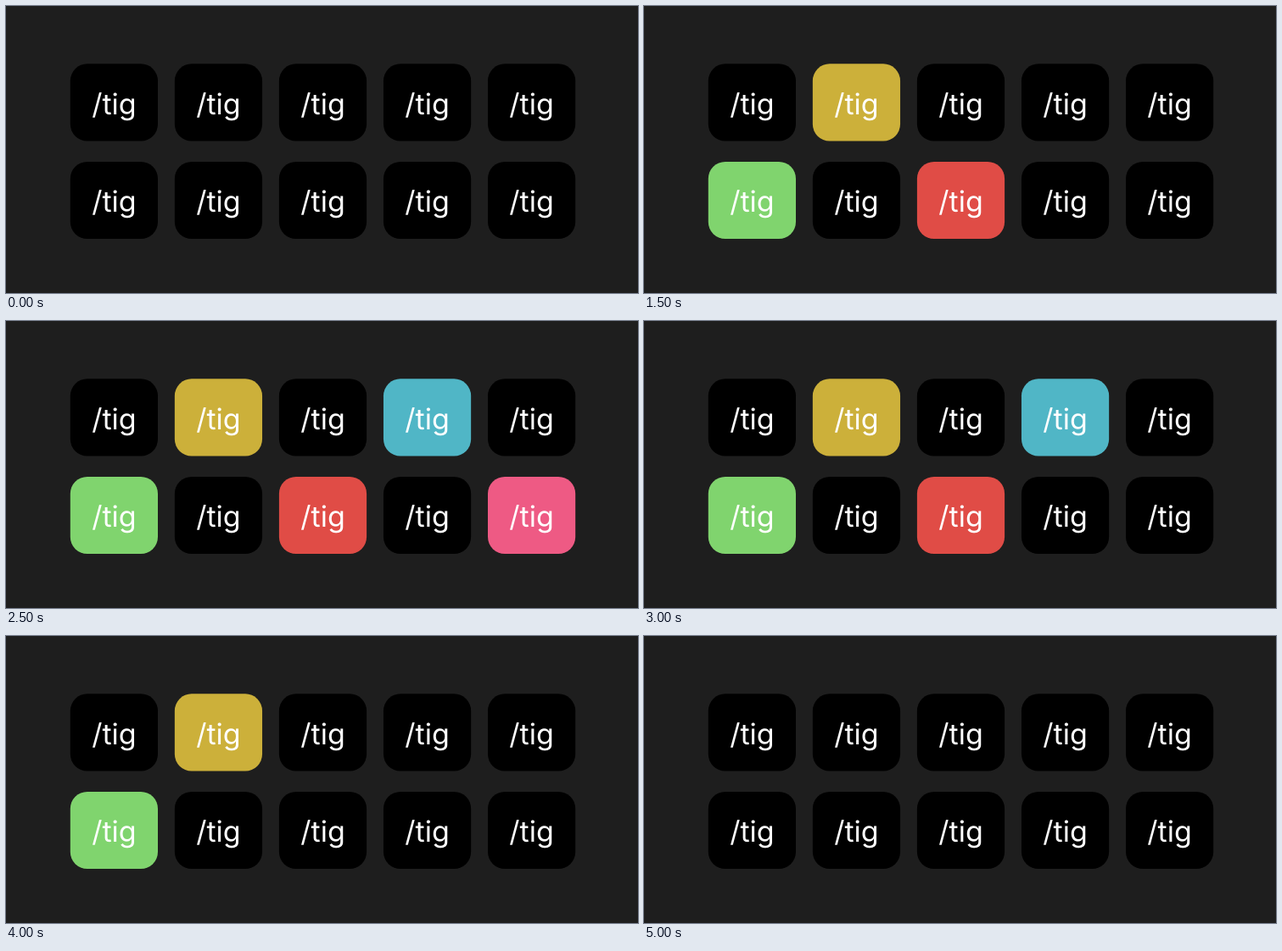
Recreate the animation shown at these times as an HTML page. Size 745 by 339 pixels, loop 5.5 s.

```html
<!DOCTYPE html>
<html lang="en">
<head>
<meta charset="utf-8">
<title>Tiles</title>
<style>
  html, body { margin: 0; width: 100%; height: 100%; overflow: hidden; background: #1e1e1e; }
  svg { display: block; width: 100%; height: 100%; }
  text {
    font: 400 34px Inter, sans-serif;
    font-optical-sizing: none;
    font-variation-settings: 'opsz' 14;
    fill: #fff;
    text-anchor: middle;
    text-rendering: geometricPrecision;
  }
</style>
</head>
<body>
<svg id="stage" viewBox="0 0 745 339">
  <rect width="745" height="339" fill="#1e1e1e"/>
</svg>
<script>
const STEP = 500;
const STEPS = 11;
const COLS = 5;
const ROWS = 2;
const stage = document.getElementById('stage');

// Tiles in the order they light up; they go dark in reverse.
const lights = [
  { col: 0, row: 1, color: '#80d46e' },
  { col: 1, row: 0, color: '#ccb03a' },
  { col: 2, row: 1, color: '#e04c46' },
  { col: 3, row: 0, color: '#50b6c6' },
  { col: 4, row: 1, color: '#ee5a84' }
];

function add(tag, attrs) {
  const node = document.createElementNS('http://www.w3.org/2000/svg', tag);
  for (const key in attrs) node.setAttribute(key, attrs[key]);
  return stage.appendChild(node);
}

function addTile(col, row) {
  const x = 75.8 + col * 123.05;
  const y = 68.3 + row * 115.6;
  const tile = add('rect', { x, y, width: 103.2, height: 91.2, rx: 20, fill: '#000' });
  add('text', { x: x + 51.6, y: y + 59.3 }).textContent = '/tig';
  return tile;
}

const tiles = Array.from({ length: ROWS }, (_, row) =>
  Array.from({ length: COLS }, (_, col) => addTile(col, row)));

function render(time) {
  const step = Math.floor(time / STEP) % STEPS;
  const lit = Math.min(step, STEPS - 1 - step);
  lights.forEach(({ col, row, color }, i) =>
    tiles[row][col].setAttribute('fill', i < lit ? color : '#000'));
}

const start = performance.now();
function tick() {
  render(performance.now() - start);
  requestAnimationFrame(tick);
}
tick();
</script>
</body>
</html>
```
